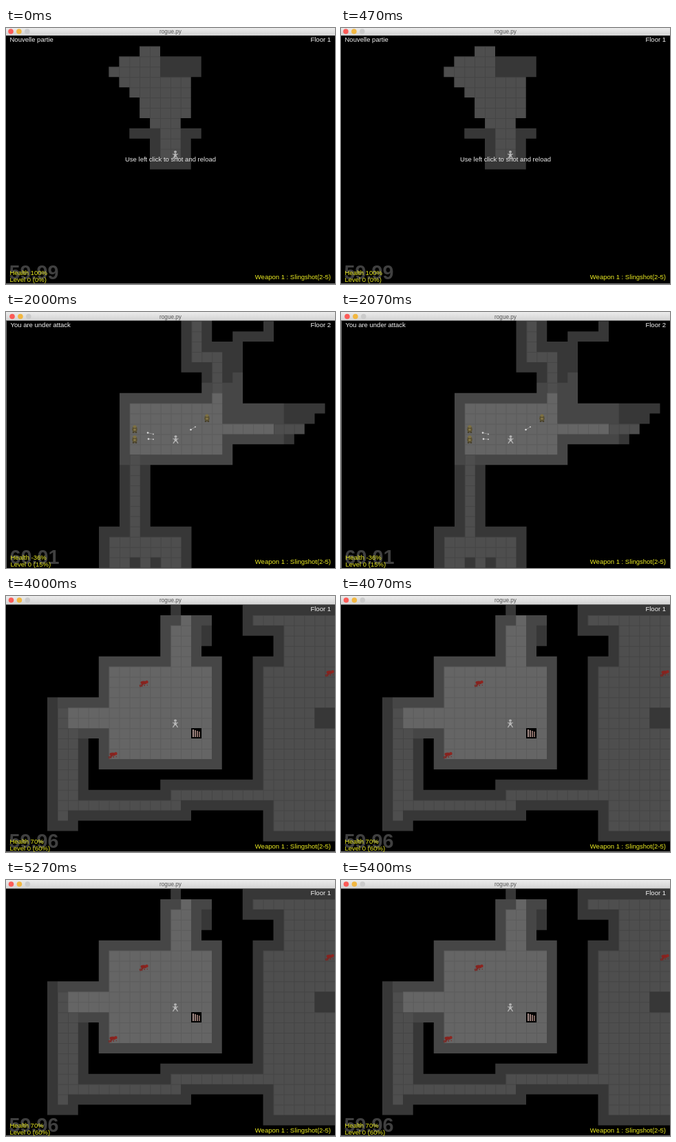
Write an HTML page with a canvas that moves like this. It is 478 px wide and 372 px high and loops after 5.99 s.

```html
<!DOCTYPE html>
<html lang="en">
<head>
<meta charset="utf-8">
<title>rogue.py</title>
<style>
  html, body { margin: 0; width: 100%; height: 100%; overflow: hidden; background: #000; }
  canvas { display: block; }
</style>
</head>
<body>
<canvas id="stage" width="478" height="372"></canvas>
<script>
const W = 478, H = 372, LOOP = 5990, CELL = 14.93, SS = 4;
const FONT = '"Liberation Sans", Arial, sans-serif';
const LIT = { floor: 101, wall: 70 }, DIM = { floor: 78, wall: 55 };

const ctx = document.getElementById('stage').getContext('2d');
const sheet = document.createElement('canvas');
sheet.width = W * SS;
sheet.height = H * SS;
const map = sheet.getContext('2d');
map.scale(SS, SS);

const gray = v => `rgb(${v},${v},${v})`;

function box(color, x, y, w, h, c = ctx) {
  c.fillStyle = color;
  c.fillRect(x, y, w, h);
}

function dot(color, x, y, rx, ry = rx) {
  ctx.fillStyle = color;
  ctx.beginPath();
  ctx.ellipse(x, y, rx, ry, 0, 0, 7);
  ctx.fill();
}

function line(color, width, x1, y1, x2, y2) {
  ctx.strokeStyle = color;
  ctx.lineWidth = width;
  ctx.beginPath();
  ctx.moveTo(x1, y1);
  ctx.lineTo(x2, y2);
  ctx.stroke();
}

function label(str, x, y, color, align = 'left', size = 9.5, weight = '') {
  ctx.font = `${weight} ${size}px ${FONT}`;
  ctx.textAlign = align;
  ctx.fillStyle = color;
  ctx.fillText(str, x, y);
}

// Areas are [left, top, right, bottom] in cells. Every room gets a ring of
// wall one cell thick; rooms in sight are lit, remembered ones are dim.
function drawMap({ origin: [ox, oy], lit = {}, dim = {}, pillars = [], fog = [] }) {
  const snap = v => Math.round(v * SS) / SS;
  const gx = k => snap(ox + k * CELL), gy = k => snap(oy + k * CELL);
  const fill = (color, [l, t, r, b]) =>
    box(color, gx(l), gy(t), gx(r) - gx(l), gy(b) - gy(t), map);
  const tiles = (shade, [l, t, r, b]) => {
    fill(gray(shade), [l, t, r, b]);
    const seam = gray(shade - 9);
    for (let x = l; x < r; x++) box(seam, gx(x), gy(t), 1, gy(b) - gy(t), map);
    for (let y = t; y < b; y++) box(seam, gx(l), gy(y), gx(r) - gx(l), 1, map);
  };
  const layers = [[dim, DIM], [lit, LIT]];

  box('#000', 0, 0, W, H, map);
  for (const [{ rooms = [], walls = [] }, tone] of layers) {
    for (const [l, t, r, b] of rooms) fill(gray(tone.wall), [l - 1, t - 1, r + 1, b + 1]);
    for (const a of walls) fill(gray(tone.wall), a);
  }
  for (const [{ rooms = [], bare = [] }, tone] of layers)
    for (const a of [...rooms, ...bare]) tiles(tone.floor, a);
  for (const a of pillars) fill(gray(DIM.wall), a);
  for (const a of fog) fill('#000', a);

  ctx.imageSmoothingQuality = 'high';
  ctx.drawImage(sheet, 0, 0, W, H);
}

function player(x, y) {
  dot('#b4b4b4', x, y - 4, 2, 1.7);
  dot('#bcbcbc', x, y + 0.5, 2, 2.5);
  for (const side of [-1, 1]) {
    line('#b0b0b0', 1.2, x, y + 0.5, x + side * 4, y - 1);
    line('#b8b8b8', 1.4, x + side, y + 2, x + side * 3.5, y + 6);
  }
}

function enemy(x, y) {
  dot('#5a5133', x, y + 0.5, 3.8, 4.5);
  dot('#7d7041', x, y - 3.5, 2.5, 2);
  dot('#8a7b48', x, y + 1, 1.8, 1.5);
  for (const side of [-1, 1]) dot('#443d28', x + side * 2, y + 5, 1.4, 1);
}

function bolt(x, y, dx, dy) {
  line('#8f8f8f', 1, x, y, x + dx, y + dy);
  dot('#dedede', x, y, 1.3);
  dot('#c8c8c8', x + dx, y + dy, 1);
}

function blood(x, y) {
  let seed = 11;
  const rnd = () => (seed = seed * 16807 % 2147483647) / 2147483647;
  dot('#86231f', x - 1, y - 1, 4.5, 2.4);
  dot('#8e2520', x + 3.5, y - 2, 2.2);
  for (let i = 0; i < 7; i++)
    dot('#7d2420', x + rnd() * 13 - 6.5, y + 1 + rnd() * 4, 0.6 + rnd() * 0.8);
}

function stairs(x, y) {
  box('#000', x, y, 15, 15);
  for (let i = 0; i < 4; i++)
    box(`hsl(10,14%,${60 - i * 6}%)`, x + 2 + i * 3, y + 2 + i, 2, 11 - i);
}

function titleBar(h, x, y, base) {
  const g = ctx.createLinearGradient(0, 0, 0, h);
  g.addColorStop(0, '#ececec');
  g.addColorStop(1, '#d2d2d2');
  box(g, 0, 0, W, h);
  ['#fc5b57', '#f2b740', '#cbcbcb'].forEach((c, i) => dot(c, x + i * 11.9, y, 3.8));
  label('rogue.py', 239, base, '#555', 'center', 8.2);
}

function hud(s) {
  const white = '#f4f4f4', yellow = '#eeee22';
  label(s.message, s.left, s.top, white);
  label('Floor ' + s.level, 472, s.top, white, 'right');
  label(s.fps, s.left - 1, s.low, '#404040', 'left', 28.8, 'bold');
  label('Health ' + s.health, s.left, s.low - 6, yellow);
  label('Level 0 ' + s.xp, s.left, s.low + 3.7, yellow);
  label('Weapon 1 : Slingshot(2-5)', 472, s.low + 0.3, yellow, 'right');
}

// The far end of the entrance is seen as a staggered fan of rows.
const fan = [2, 3, 4, 5, 6].map(y => [10 + Math.abs(y - 3), y, y < 4 ? 15 : 18, y + 1]);

const scenes = [
  {
    end: 2000, message: 'Nouvelle partie', level: 1, fps: '59.99', health: '100%', xp: '(0%)',
    bar: [11, 7, 5, 8], left: 5.5, top: 20, low: 365, edge: [0, 371, W, 1],
    origin: [0, 11.5],
    dim: {
      rooms: [[15, 10, 17, 12]],
      bare: [...fan, [13, 1, 15, 2], [13, 7, 18, 8], [14, 8, 17, 9], [15, 9, 17, 10]],
      walls: [[15, 2, 19, 4], [12, 9, 19, 10]]
    },
    actors() {
      player(246, 184);
      label('Use left click to shot and reload', 239, 194, '#ececec', 'center');
    }
  },
  {
    end: 4000, message: 'You are under attack', level: 2, fps: '60.01', health: '-36%', xp: '(15%)',
    bar: [12.5, 9, 6.5, 10], left: 6.5, top: 22, low: 366, edge: [0, 13, 1, H],
    origin: [0.7, 13.2],
    lit: {
      rooms: [[12, 8, 21, 13], [20, 7, 21, 8], [21, 10, 26, 11]],
      walls: [[21, 8, 27, 9], [22, 5, 23, 8]]
    },
    dim: {
      rooms: [[18, 0, 19, 4], [18, 3, 21, 4], [20, 4, 21, 7], [26, 10, 29, 11],
        [12, 13, 13, 21], [10, 21, 17, 24]],
      walls: [[22, 1, 23, 5], [22, 1, 26, 2], [25, 0, 26, 1], [27, 8, 31, 9]]
    },
    pillars: [[12, 23, 13, 24], [14, 23, 15, 24]],
    fog: [[28, 11, 30, 12], [29, 10, 30, 11]],
    actors() {
      enemy(187, 170);
      enemy(187, 185);
      enemy(292, 154);
      player(246.5, 185);
      bolt(206, 175.5, 8, 2);
      bolt(207, 184.5, 7, 0.5);
      bolt(268.5, 171, 6.5, -4);
    }
  },
  {
    end: LOOP, message: '', level: 1, fps: '59.96', health: '70%', xp: '(60%)',
    bar: [12.5, 7.5, 6, 9], left: 5.5, top: 22, low: 366.3, edge: [0, 371, W, 1],
    origin: [0.3, 13],
    lit: {
      rooms: [[10, 6, 20, 15], [6, 10, 10, 12], [16, 2, 18, 6]],
      bare: [[17, 1, 18, 2]],
      walls: [[18, 1, 20, 2]]
    },
    dim: {
      rooms: [[24, 1, 33, 2], [27, 2, 33, 6], [25, 6, 33, 19], [26, 19, 33, 22],
        [16, 18, 25, 19], [5, 10, 7, 20], [5, 19, 17, 20], [5, 20, 6, 21]],
      walls: [[16, 0, 17, 1], [18, 2, 20, 4]]
    },
    pillars: [[30, 10, 33, 12]],
    actors() {
      blood(201, 127);
      blood(156, 231);
      blood(471, 112);
      player(246, 185);
      stairs(269, 192);
    }
  }
];

function render(s) {
  drawMap(s);
  s.actors();
  box('#777', ...s.edge);
  titleBar(...s.bar);
  hud(s);
}

const start = performance.now();
let shown;

function tick() {
  const t = (performance.now() - start) % LOOP;
  const scene = scenes.find(s => t < s.end);
  if (scene !== shown) render(shown = scene);
  requestAnimationFrame(tick);
}
tick();
</script>
</body>
</html>
```
